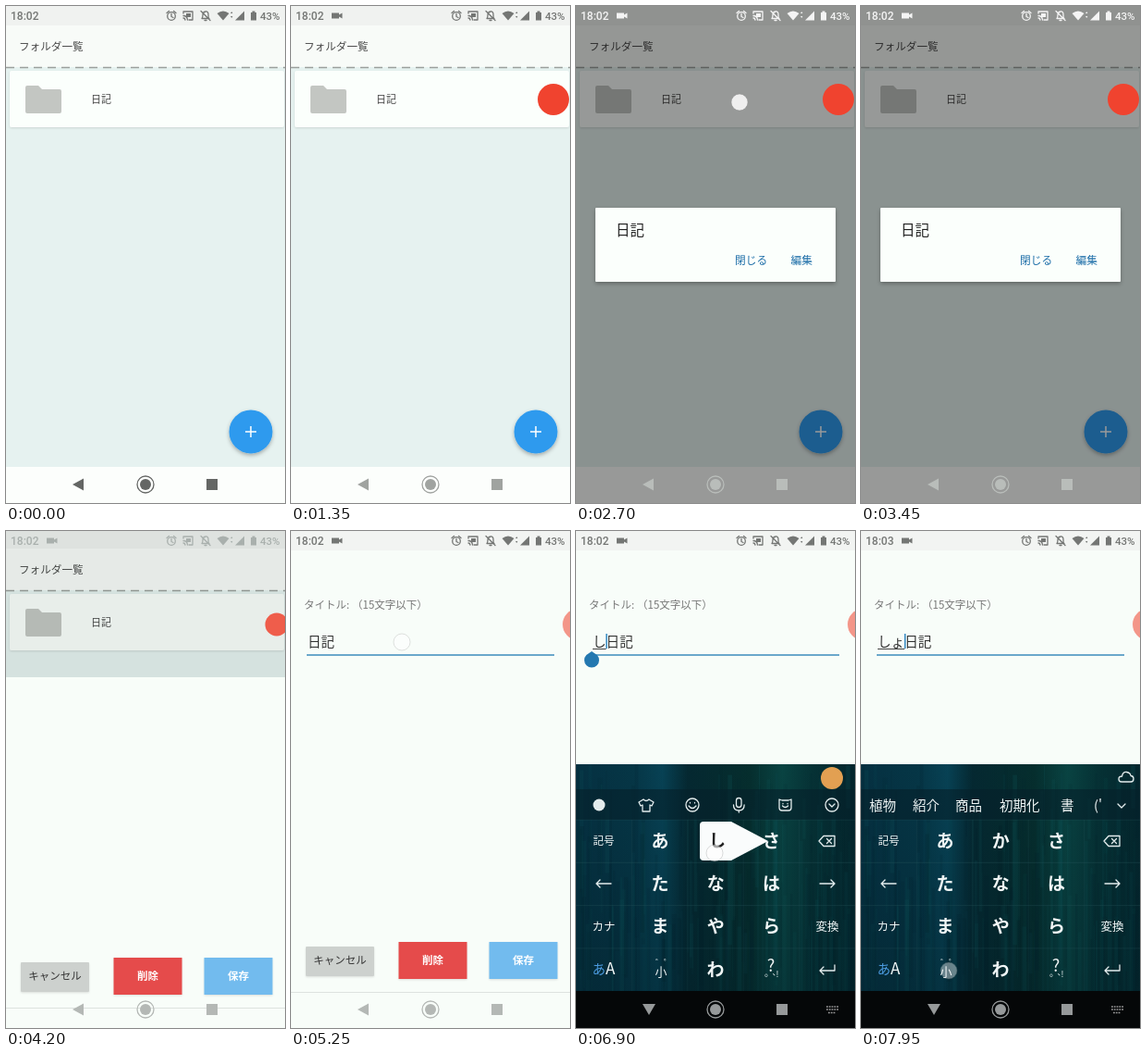
Write an HTML page that moves like this. It is 302 by 537 pixels and loops after 8000 ms.

```html
<!DOCTYPE html>
<html lang="ja">
<head>
<meta charset="utf-8">
<style>
html, body { margin: 0; width: 100%; height: 100%; overflow: hidden; background: #f8fdf9; }
svg { display: block; width: 100vw; height: 100vh; }
text { font-family: "Noto Sans CJK JP", "Noto Sans CJK", sans-serif; }
.num { font-family: Roboto, sans-serif; }
.mid { text-anchor: middle; }
.line { fill: none; stroke: currentColor; stroke-width: 1.3; stroke-linecap: round; stroke-linejoin: round; }
#keys text { fill: #f1f6f6; }
</style>
</head>
<body>
<svg viewBox="0 0 302 537">
  <defs>
    <filter id="shadow" x="-20%" y="-20%" width="140%" height="150%">
      <feDropShadow dx="0" dy="2" stdDeviation="2" flood-opacity=".3"/>
    </filter>
    <filter id="soft" x="-20%" y="-20%" width="140%" height="150%">
      <feDropShadow dx="0" dy="1" stdDeviation="1" flood-opacity=".12"/>
    </filter>
    <linearGradient id="wood">
      <stop offset="0" stop-color="#063345"/><stop offset=".2" stop-color="#06394a"/>
      <stop offset=".31" stop-color="#08465a"/><stop offset=".4" stop-color="#052a33"/>
      <stop offset=".62" stop-color="#06302f"/><stop offset=".74" stop-color="#0a4846"/>
      <stop offset=".85" stop-color="#063437"/><stop offset="1" stop-color="#04282f"/>
    </linearGradient>
    <linearGradient id="fade" x2="0" y2="1">
      <stop offset="0" stop-color="#021a22" stop-opacity=".1"/><stop offset="1" stop-color="#021a22" stop-opacity=".4"/>
    </linearGradient>
    <clipPath id="reveal"><rect id="revealBox" width="302" height="537"/></clipPath>
  </defs>

  <g id="list">
    <rect y="-4" width="302" height="545" fill="#e6f2f0"/>
    <rect y="-4" width="302" height="70" fill="#f8fbf8"/>
    <rect y="-4" width="302" height="25" fill="#f0f2f0"/>
    <text x="14" y="48" font-size="11.6" fill="#484848">フォルダ一覧</text>
    <path d="M0 66.5H302" stroke="#9a9f9c" stroke-width="1.5" stroke-dasharray="9 6"/>
    <rect x="4" y="70" width="297" height="61" rx="2" fill="#fbfffc" filter="url(#soft)"/>
    <path d="M21 88q0-2 2-2h12l4 4h19q2 0 2 2v22q0 2-2 2H23q-2 0-2-2z" fill="#c3c6c2"/>
    <text x="92" y="105" font-size="11" fill="#484848">日記</text>
    <circle cx="265" cy="460" r="23.5" fill="#2f9aee" filter="url(#shadow)"/>
    <path d="M259 460h12M265 454v12" stroke="#fff" stroke-width="1.5"/>
    <rect y="498" width="302" height="43" fill="#fcfefc"/>
  </g>
  <rect id="dim" width="302" height="537"/>

  <g id="dialog">
    <rect x="21" y="218" width="260" height="80" rx="1" fill="#fbfffc" filter="url(#shadow)"/>
    <text x="43" y="248" font-size="15.5" fill="#222">日記</text>
    <g font-size="11.7" font-weight="500" fill="#1d6ea8">
      <text x="172" y="279">閉じる</text><text x="232.5" y="279">編集</text>
    </g>
  </g>

  <g id="edit" clip-path="url(#reveal)">
    <rect width="302" height="537" fill="#f8fdf9"/>
    <g id="form">
      <text x="14" y="84" font-size="11.5" fill="#777">タイトル:</text>
      <text x="66" y="84" font-size="11.5" fill="#777">（15文字以下）</text>
      <path d="M17 134H285" stroke="#3d8dbd" stroke-width="1.6"/>
      <text id="field" x="18" y="125" font-size="14.6" font-weight="500" fill="#333"></text>
      <path id="compose" stroke="#444"/>
      <path id="caret" d="M0 111v16" stroke="#2f86c0" stroke-width="1.5"/>
      <path id="handle" d="M0 130L5.8 134A8 8 0 1 1-5.8 134Z" fill="#2478b0"/>
      <g font-size="11.5" font-weight="700" class="mid">
        <rect x="16" y="449" width="74" height="32" rx="1" fill="#cdd1ce" filter="url(#soft)"/>
        <rect x="116.5" y="444" width="74" height="40" fill="#e54b4b" filter="url(#soft)"/>
        <rect x="214.5" y="444" width="74" height="40" fill="#72bbee" filter="url(#soft)"/>
        <text x="53" y="468" fill="#333" font-weight="500">キャンセル</text>
        <text x="153.5" y="468" fill="#fff">削除</text>
        <text x="251.5" y="468" fill="#fff">保存</text>
      </g>
      <path d="M0 498.5H302" stroke="#dde2df"/>
    </g>
    <rect width="302" height="21" fill="#f2f4f2"/>
  </g>

  <g id="keys">
    <rect y="252" width="302" height="286" fill="url(#wood)"/>
    <g id="grain"></g>
    <rect y="252" width="302" height="245" fill="url(#fade)"/>
    <rect y="279" width="302" height="33" fill="#06202a" opacity=".6"/>
    <g id="tools" color="#e4eced">
      <circle cx="277" cy="267" r="12" fill="#e2a052"/>
      <circle cx="25" cy="296" r="6.5" fill="#e4eced"/>
      <path class="line" d="M73 290l-5 3 2 4 2-1v7h8v-7l2 1 2-4-5-3q-3 3-6 0z"/>
      <g class="line">
        <circle cx="126" cy="296" r="7"/><path d="M122 297q4 5 8 0M123.5 293.5v.4M128.5 293.5v.4"/>
        <rect x="173.500" y="288.500" width="5.500" height="10" rx="2.700"/><path d="M170.500 296q0 6 5.800 6t5.800-6M176.300 302v2"/>
        <path d="M220 290l3 1h7l3-1v9q0 3-3 3h-7q-3 0-3-3zM223.500 297q3 3 6 0M224 294.500v.3M229 294.500v.3"/>
        <circle cx="277" cy="296" r="7"/><path d="M274 295l3 3 3-3"/>
      </g>
    </g>
    <g id="words" color="#e4eced">
      <path class="line" d="M282 271q-3 0-3-3t3.500-3q1-5 5-4.500t4.500 4q3 0 3 3.200t-3 3.300z"/>
      <path class="line" d="M278 295l4 4 4-4"/>
      <g id="picks" font-size="14.5" font-weight="500"></g>
    </g>
    <g id="pad"></g>
    <g class="line" color="#e4eced">
      <path d="M268 329.500h12v11h-12l-5-5.500zM271.500 332.500l5 5M276.500 332.500l-5 5"/>
      <path d="M38 381H22l4-4M22 381l4 4M264 381h16l-4-4M280 381l-4 4"/>
      <path d="M280 469v6h-16l4-4M264 475l4 4"/>
      <path id="space" d="M264 430v4h16v-4"/>
    </g>
    <g id="popup">
      <path id="bubble" d="M-17-17q0-4 4-4h30L57 0 17 21h-30q-4 0-4-4z" fill="#fafcfc"/>
      <text id="flick" class="mid" x="2" y="6" font-size="18" font-weight="700" style="fill:#222"></text>
    </g>
  </g>

  <g id="nav">
    <rect id="navBack" y="497" width="302" height="40" fill="#050708"/>
    <path id="back"/>
    <circle cx="151" cy="517" r="6"/>
    <circle cx="151" cy="517" r="9" fill="none" stroke="currentColor" stroke-width="1.3"/>
    <rect x="217" y="511" width="12" height="12"/>
    <path id="board" d="M271 514h13M271 517h13M273 520.5h8" stroke="#999" stroke-width="1.7" stroke-dasharray="1.8 1"/>
  </g>

  <g id="status" fill="currentColor">
    <text id="clock" class="num" x="5" y="15" font-size="12" font-weight="500"></text>
    <path id="camera" d="M44 7.500h8v2l3.500-2v6l-3.500-2v2h-8z"/>
    <g class="line">
      <circle cx="179" cy="11" r="4.300"/><path d="M179 8.500v3l2 1M174 7.500l2.500-2M184 7.500l-2.500-2"/>
      <path d="M192 8V6h10v9h-4M192 10.500q4 0 4.500 4.500M192 13q1.500 0 2 2"/>
      <path d="M212 13.500q1-1 1-4t3-3.500 3 3.500 1 4zM215 15.500h2M211 5.500l10 10"/>
    </g>
    <rect x="195" y="8" width="5" height="4"/>
    <path d="M228.500 8q6.500-5 13 0l-6.500 7.500z"/>
    <path d="M243 8l1.200-2 1.200 2zM243 11h2.400l-1.200 2z"/>
    <path d="M248 15.500h10v-10z"/>
    <path d="M265 7h1.500V5.500h3V7h1.500v8.500h-6z"/>
    <text class="num" x="275" y="15" font-size="11.5" font-weight="500">43%</text>
  </g>
  <circle id="ball" cy="101" fill="#f0432f"/>
  <circle id="touch" r="9" fill="#fff" stroke="#8a8a8a" stroke-opacity=".5"/>
</svg>

<script>
const LOOP = 8000, STEP = 150;
const $ = id => document.getElementById(id);
const set = (id, attrs) => { for (const k in attrs) $(id).setAttribute(k, attrs[k]); };
const show = (id, on) => set(id, { visibility: on ? 'visible' : 'hidden' });
const label = (id, s) => { if ($(id).textContent !== s) $(id).textContent = s; };
const move = (id, x, y) => set(id, { transform: `translate(${x} ${y})` });

// wood grain from seeded vertical streaks
let seed = 7;
const rnd = () => (seed = seed * 16807 % 2147483647) / 2147483647;
let grain = '';
for (let i = 0; i < 190; i++) {
  const y = 252 + rnd() * 190, h = Math.min(497 - y, 40 + rnd() * 160);
  const tone = rnd() < .55 ? '#02202b' : '#106064';
  grain += `<rect x="${rnd() * 302}" y="${y}" width="${1 + rnd() * 4}" height="${h}" fill="${tone}" opacity="${.06 + rnd() * .16}"/>`;
}
for (let r = 0; r < 4; r++) grain += `<path d="M0 ${312 + r * 46.3}H302" stroke="#3b7176" opacity=".3"/>`;
for (let c = 1; c < 5; c++) grain += `<path d="M${c * 60.4} 312V497" stroke="#3b7176" opacity=".18"/>`;
$('grain').innerHTML = grain;

const key = (s, x, y, size, weight = 500) =>
  `<text class="mid" x="${x}" y="${y + size * .37}" font-size="${size}" font-weight="${weight}">${s}</text>`;

function pad(composing) {
  let out = '';
  [...'あかさたなはまやら'].forEach((s, i) =>
    out += key(s, 91 + i % 3 * 60.3, 335 + Math.floor(i / 3) * 46.2, 19, 700));
  out += key('わ', 151, 474, 19, 700) + key('記号', 30, 335, 11.5);
  out += key('<tspan fill="#4c9be0">あ</tspan><tspan font-size="17">A</tspan>', 30, 474, 14.5);
  out += key('?', 211, 469, 18) + key('。', 209, 477, 10) + key('、', 217, 477, 9) + key('!', 218, 479, 9);
  return out + (composing
    ? key('カナ', 30, 427, 12.5) + key('変換', 272, 427, 12.5) + key('小', 92, 476, 13) + key('゛゜', 95, 467, 9)
    : key('123', 30, 427, 13) + key('^_^', 91, 472, 15));
}

const picks = {
  'し': [['し', 9], ['自分', 40], ['仕事', 86], ['写真', 132], ['質問', 179], ['資料', 225]],
  'しよ': [['使用', 9], ['しよう', 56], ['仕様', 118], ['飼養', 165], ['書', 216], ["('", 252]],
  'しょ': [['植物', 9], ['紹介', 56], ['商品', 102], ['初期化', 150], ['書', 216], ["('", 252]]
};

// start, end, x, y, opacity
const touches = [
  [1950, 2850, 177, 104, .85], [3600, 3900, 255, 275, .8], [5250, 5400, 120, 120, .5],
  [6150, 6300, 20, 120, .5], [6750, 6900, 208, 338, .5], [6900, 7050, 150, 348, .6],
  [7350, 7500, 151, 430, .5], [7500, 7650, 151, 475, .6], [7800, 8000, 95, 475, .4]
];

let lastTyped;

function draw(time) {
  const t = Math.floor(time / STEP) * STEP;
  const ramp = (a, b) => Math.max(0, Math.min(1, (t - a) / (b - a)));
  const ease = (a, b) => 1 - (1 - ramp(a, b)) ** 2;
  const opening = t >= 4050, board = t >= 5400;
  const typed = t < 6900 ? '' : t < 7500 ? 'し' : t < 7800 ? 'しよ' : 'しょ';

  // folder list and dialog
  const dialog = ease(2400, 2700) * (1 - ramp(3750, 4050));
  const dim = t < 3750 ? .4 * dialog : .4 - .32 * ramp(3750, 4050);
  move('list', 0, opening ? -2 : 0);
  set('dim', { opacity: dim, fill: opening ? '#14281c' : '#000' });
  set('dialog', { opacity: dialog });

  // edit screen uncovers from the bottom
  const top = t < 4200 ? 390 : 158 * (1 - ease(4200, 4500));
  set('revealBox', { y: top });
  move('form', 0, t < 4200 ? 30 : 17 * (1 - ease(4200, 4500)));
  show('edit', opening);

  // text field
  const width = typed.length * 14.6;
  label('field', typed + '日記');
  set('compose', { d: `M18 127.5h${width}` });
  show('compose', typed);
  const handleX = t < 6300 ? 47 : 17;
  move('caret', typed ? 18.5 + width : handleX + .5, 0);
  show('caret', board && (typed || t % 900 >= 450));
  move('handle', handleX, 0);
  show('handle', t >= 5550 && t < 7050);

  // keyboard
  move('keys', 0, 290 * (1 - ease(5250, 5700)));
  show('keys', board);
  if (typed !== lastTyped) {
    lastTyped = typed;
    $('pad').innerHTML = pad(typed);
    $('picks').innerHTML = (picks[typed] || []).map(([s, x]) => `<text x="${x}" y="301.5">${s}</text>`).join('');
  }
  const wordsOn = t >= 7050;
  set('tools', { display: wordsOn ? 'none' : 'inline' });
  set('words', { display: wordsOn ? 'inline' : 'none' });
  set('space', { display: typed ? 'none' : 'inline' });
  const side = t === 6900, down = t === 7500;
  set('popup', { display: side || down ? 'inline' : 'none' });
  move('popup', 151, side ? 335 : 473);
  set('bubble', { transform: `rotate(${side ? 0 : -90})` });
  label('flick', side ? 'し' : 'よ');

  // system bars
  const dark = dim > .2 && !opening;
  set('status', { color: dark ? '#f4f4f4' : opening && t < 4350 ? '#a9b0ad' : '#747674' });
  label('clock', t < 7200 ? '18:02' : '18:03');
  show('camera', t >= 300);
  show('navBack', board);
  show('board', board);
  const ink = board ? '#96999a' : dark ? '#b9bdba' : t < 300 ? '#646664' : opening ? '#b4b8b5' : '#a0a3a0';
  set('nav', { color: ink, fill: ink });
  set('back', { d: board ? 'M72 511h14l-7 12z' : 'M72 517l12-6.5v13z' });

  // floating ball shrinks while it docks at the edge
  const dock = ramp(4050, 4500);
  set('ball', {
    cx: 284 + 27 * dock,
    r: 17 - 5.2 * Math.sin(Math.PI * dock),
    opacity: 1 - .45 * dock
  });
  show('ball', t >= 300);

  const touch = touches.find(([a, b]) => t >= a && t < b);
  show('touch', touch);
  if (touch) set('touch', { cx: touch[2], cy: touch[3], opacity: touch[4] });
}

const start = performance.now();
function tick() {
  draw((performance.now() - start) % LOOP);
  requestAnimationFrame(tick);
}
tick();
</script>
</body>
</html>
```
